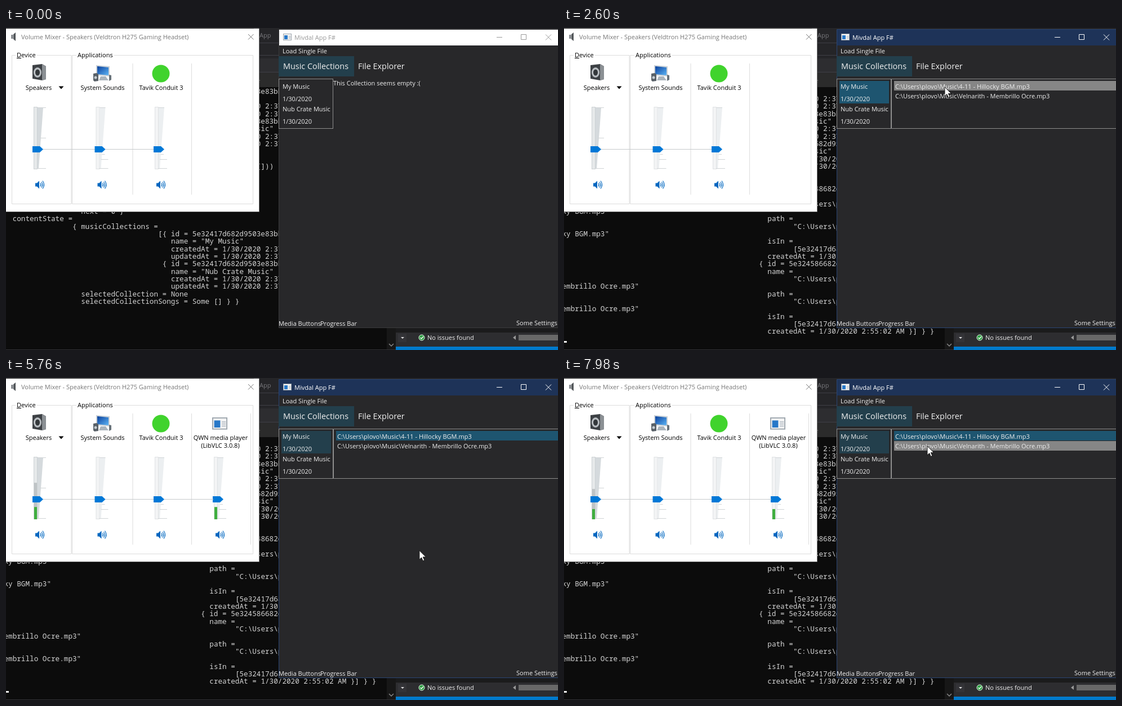
Animation of 980 by 572 pixels, one loop 8 s. Source, as an HTML page:

```html
<!DOCTYPE html>
<html lang="en">
<head>
<meta charset="utf-8">
<title>Music app with volume mixer</title>
<style>
html, body { margin: 0; width: 100%; height: 100%; overflow: hidden; background: #0c0c0c; }
svg { display: block; width: 980px; height: 572px; }
text { font: 11px "Open Sans", sans-serif; white-space: pre; }
.mono { font: 12.667px "Noto Sans Mono", monospace; fill: #d4d4d4; }
.tab { font-size: 14.4px; }
.mid { text-anchor: middle; }
.light { fill: #f0f0f0; }
.line { fill: none; stroke: #dcdcdc; }
.frame { fill: none; stroke: #8e8e8e; }
</style>
</head>
<body>
<svg viewBox="0 0 980 572">
  <defs>
    <clipPath id="consoleClip"><rect y="105" width="676" height="465"/></clipPath>
    <linearGradient id="screen" x2="1" y2="1"><stop stop-color="#0a3f9c"/><stop offset="1" stop-color="#5cb4f5"/></linearGradient>
    <g id="appIcon">
      <rect x=".5" y=".5" width="14" height="11" fill="#f4f4f4" stroke="#9aa3ab"/>
      <rect x="2" y="3" width="6" height="7" fill="#2878c8"/>
      <path d="M9.5 4.5h4M9.5 6.5h4M9.5 8.5h4" stroke="#b4bcc4"/>
    </g>
  </defs>

  <!-- editor and console behind -->
  <rect width="980" height="572" fill="#0c0c0c"/>
  <rect x="440" width="540" height="80" fill="#252528"/>
  <path d="M440 26.5h44M440 48.5h44M440 78.5h44" stroke="#3f3f46"/>
  <rect x="440" y="54" width="44" height="24" fill="#2d2d30"/>
  <rect x="440" y="79" width="44" height="26" fill="#2b2b2b"/>
  <text x="450" y="17" fill="#77777b">App</text>
  <text x="445" y="97" fill="#aaa">e</text>
  <g id="console" clip-path="url(#consoleClip)"></g>
  <rect id="caret" y="556" width="5" height="3" fill="#eee"/>
  <rect x="676" y="533" width="16" height="38" fill="#171717"/>
  <path d="M680 561l4 4 4-4" fill="none" stroke="#888" stroke-width="1.5"/>
  <rect y="571" width="692" height="1" fill="#333337"/>
  <rect x="692" y="533" width="288" height="9" fill="#1b1b1c"/>
  <rect x="692" y="541" width="288" height="25" fill="#2d2d30"/>
  <rect x="692" y="566" width="288" height="6" fill="#007acc"/>
  <rect x="696" y="543" width="15" height="15" fill="#333337"/>
  <path d="M701 549h6l-3 3z" fill="#ddd"/>
  <circle cx="738" cy="550" r="5" fill="#2f9e44" stroke="#e8f5e8"/>
  <path d="M735.5 550l2 2 3.5-4" fill="none" stroke="#fff" stroke-width="1.4"/>
  <text class="light" x="748" y="554">No issues found</text>
  <path d="M905 546v8l-5-4z" fill="#999"/>
  <rect x="910" y="545" width="70" height="10" fill="#686868"/>

  <!-- music app -->
  <rect x="484" y="2" width="496" height="531" fill="#28282a"/>
  <rect id="titleBar" x="484" y="3" width="496" height="28"/>
  <path id="appBorder" d="M980 2.5H484.5V532.5H980" fill="none"/>
  <use href="#appIcon" x="492" y="10"/>
  <g id="titleInk">
    <text x="512" y="20.5" stroke="none">Mivdal App F#</text>
    <path d="M871 16.5h10M914.5 11.5h9v9h-9zM958 11.5l10 10m0-10l-10 10" fill="none"/>
  </g>
  <rect x="484" y="50" width="134" height="36" fill="#233f4c"/>
  <g class="light">
    <text x="491" y="45">Load Single File</text>
    <text class="tab" x="492" y="73">Music Collections</text>
    <text class="tab" x="625" y="73">File Explorer</text>
    <text x="484" y="529">Media Buttons</text>
    <text x="558" y="529">Progress Bar</text>
    <text x="906" y="527.5">Some Settings</text>
  </g>
  <rect class="frame" x="484.5" y="90.5" width="96" height="88"/>
  <rect id="collection" x="489" y="94" width="88" height="40"/>
  <g class="light">
    <text x="491" y="107.5">My Music</text>
    <text x="491" y="130">1/30/2020</text>
    <text x="491" y="147.5">Nub Crate Music</text>
    <text x="491" y="170">1/30/2020</text>
    <text id="empty" x="581" y="102">This Collection seems empty :(</text>
    <g id="songs">
      <path class="frame" d="M980 90.5H581.5V178.5H980"/>
      <rect id="song1" x="586" y="94" width="394" height="17"/>
      <rect id="song2" x="586" y="112" width="394" height="17"/>
      <text id="path1" x="588" y="107.5"></text>
      <text id="path2" x="588" y="124.5"></text>
    </g>
  </g>

  <!-- volume mixer -->
  <rect y="1" width="449" height="325" fill="#fff"/>
  <path d="M449.5 1V326.5H0" fill="none" stroke="#6a6a6a"/>
  <path d="M9 12h3l5-4v15l-5-4h-3z" fill="#8b8f93"/>
  <path d="M14 11l3-3v15l-3-3z" fill="#4d5154"/>
  <text x="27" y="20" fill="#777">Volume Mixer - Speakers (Veldtron H275 Gaming Headset)</text>
  <path d="M430 11l9.5 9.5m0-9.5l-9.5 9.5" stroke="#777"/>
  <path class="line" d="M10.5 48.5h105.500v264h-105.500zM117.500 48.5H438.500v264H117.500zM225 63V296M329.500 63V296"/>
  <path d="M17 48.5h38M125 48.5h67" stroke="#fff" stroke-width="3"/>
  <text x="19" y="52"><tspan text-decoration="underline">D</tspan>evice</text>
  <text x="127" y="52">Applications</text>
  <path d="M47 66l17-2 7 4v23l-7 2-17-3z" fill="#3d4145"/>
  <path d="M64 64l7 4v23l-7 2z" fill="#8b9094"/>
  <ellipse cx="56" cy="79" rx="7" ry="9" fill="#b9bec2"/>
  <ellipse cx="56" cy="79" rx="4" ry="5.500" fill="#34383b"/>
  <path d="M93.500 103.500h9l-4.500 5z"/>
  <path d="M160 66l24 2v18l-24-2z" fill="#c8d0d6"/>
  <path d="M162 68l20 2v14l-20-2z" fill="url(#screen)"/>
  <path d="M168 86h9l5 7h-17z" fill="#aab4bc"/>
  <path d="M155 81l6-1 3 2v12l-7 1-2-2z" fill="#596168"/>
  <circle cx="159" cy="88" r="2.500" fill="#c5ccd1"/>
  <path d="M183 83l4 1v8l-4 2z" fill="#69737b"/>
  <circle cx="275" cy="81" r="15.500" fill="#40d32d"/>
  <g class="mid">
    <text x="58" y="109.500">Speakers</text>
    <text x="171.500" y="110">System Sounds</text>
    <text x="275.500" y="110">Tavik Conduit 3</text>
  </g>
  <path d="M64 215.500H264" stroke="#c6cacc"/>
  <g id="channels"></g>
  <g id="playerChannel">
    <path class="line" d="M434.500 63V296"/>
    <path d="M281 215.500H368" stroke="#c6cacc"/>
    <g transform="translate(366 70) scale(1.8)"><use href="#appIcon"/></g>
    <text class="mid" x="381" y="110">QWN media player</text>
    <text class="mid" x="380.500" y="124">(LibVLC 3.0.8)</text>
  </g>

  <circle id="halo" r="11" fill="#dcba28" opacity=".75"/>
  <path id="arrow" d="M0 0V16l3.700-3.500 2.600 5.800 2.600-1.100-2.600-5.700h5.200z" fill="#fff" stroke="#111" stroke-width=".9"/>
  <path id="resize" d="M0-10l4 5H1V5h3l-4 5-4-5h3V-5h-3z" fill="#fff" stroke="#111" stroke-width=".8"/>
</svg>
<script>
const $ = id => document.getElementById(id);
const LOOP = 8000;
const folder = 'C:\\Users\\plovo\\Music\\';
const songA = folder + '4-11 - Hillocky BGM.mp3';
const songB = folder + 'Velnarith - Membrillo Ocre.mp3';
$('path1').textContent = songA;
$('path2').textContent = songB;

// Console lines are [column, text] pairs.
const idA = '5e32417d682d9503e83bb400', idB = '5e32417d682d9503e83bb401';
const songId = '5e324248682d9503e83bb3ff';
const stamp = (col, end = '') => [
  [col, 'createdAt = 1/30/2020 2:37:49 AM'], [col, 'updatedAt = 1/30/2020 2:37:49 AM' + end],
];
const blank = n => Array(n).fill([0, '']);
const collections = [
  [36, `[{ id = ${idA}`], [39, 'name = "My Music"'], ...stamp(39),
  [37, `{ id = ${idB}`], [39, 'name = "Nub Crate Music"'], ...stamp(39),
];
const wrapped = path => [[54, `"${path}"`.slice(0, 35)], [0, `"${path}"`.slice(35)]];
const songRecord = (col, open, id, path, created) => [
  [col, `${open} id = ${id}`],
  [48, 'name ='], ...wrapped(path), [48, 'path ='], ...wrapped(path),
  [48, 'isIn ='], [54, `[${idB}]`], [48, `createdAt = 1/30/2020 ${created}`],
];
const idle = [
  ...collections, ...blank(2), [59, '[]))'], ...blank(5),
  [18, 'next = 0 }'], [2, 'contentState ='], [16, '{ musicCollections ='], ...collections,
  [18, 'selectedCollection = None'], [18, 'selectedCollectionSongs = Some [] } }'],
];
const selected = [
  ...idle, [0, `New message:: ContentMsg (SetSelectedCollection (Some { id = ${idA}`],
  [42, 'name = "My Music"'], ...stamp(42, ' }))'),
];
const loaded = [
  ...collections, [18, `selectedCollection = Some { id = ${idA}`],
  [46, 'name = "My Music"'], ...stamp(46, ' }'),
  [18, 'selectedCollectionSongs ='], [26, 'Some'],
  ...songRecord(45, '[{', songId, songA, '2:41:12 AM }'),
  ...songRecord(46, '{', '5e324586682d9503e83bb402', songB, '2:55:02 AM }] } }'),
];
const playing = [
  ...loaded, [0, `New message:: PlayerMsg (PlaySingle { id = ${songId}`],
  [24, `name = "${songA}"`], [24, `path = "${songA}"`],
  [24, `isIn = [${idB}]`], [24, 'createdAt = 1/30/2020 2:41:12 AM })'],
];
const consoleViews = [[...idle, ...blank(4)], selected, loaded, playing].map(lines =>
  lines.slice(-34).map(([col, text], i, all) =>
    `<text class="mono" x="${-3.5 + col * 7.6}" y="${543.3 - (all.length - 1 - i) * 13.33}">${text}</text>`).join(''));

// Mixer channels share one shape, shifted sideways.
const channel = (dx, main) => `<g transform="translate(${dx})" ${dx === 320 ? 'class="player"' : ''}>
  <path d="M56 141h10L58 250h-2z" fill="${main ? '#d5dadd' : '#eceff1'}"/>
  <rect x="49.5" y="140.500" width="6" height="110" fill="${main ? '#e6e9ea' : '#f3f4f5'}" stroke="${main ? '#ccd1d4' : '#dfe2e4'}"/>
  <path d="M56 141.500h${main ? 15 : 10}M${main ? '61 195.500h10' : '58 233.500h13M60 224.500h5'}M55 249.500h16" stroke="#d0d4d6"/>
  ${main ? '<rect class="raw" x="50" width="5" fill="#bfc4c6"/>' : ''}
  ${main || dx === 320 ? '<rect class="level" x="50" width="5" fill="#3fae3f"/>' : ''}
  <path d="M47 210h13l6 5.500-6 5.500h-13z" fill="#0078d7"/>
  <path d="M52 275.500h3l4-4v14l-4-4h-3z" fill="#0067c0"/>
  <path d="M61 275.500q2 3 0 6M63 273.500q3.500 5 0 10M65 271.500q5 7 0 14" fill="none" stroke="#0067c0" stroke-width="1.200"/>
</g>`;
$('channels').innerHTML = channel(0, true) + [110.5, 215, 320].map(dx => channel(dx, false)).join('');
const [raw] = document.getElementsByClassName('raw');
const levels = document.querySelectorAll('.level');
const [player] = document.getElementsByClassName('player');

const pointerKeys = [
  [550, 808, 530], [1060, 523, 101], [2140, 523, 101], [2600, 676, 105], [3710, 676, 105],
  [4040, 711, 262], [4370, 711, 262], [4500, 711, 271], [5580, 711, 271], [6370, 883, 537],
  [6630, 883, 537], [7240, 668, 151], [7290, 668, 151], [7500, 645, 121],
];
const levelKeys = [
  [3900, 0], [4040, .4], [4370, .4], [4430, .51], [4500, .42], [4650, .42], [4680, .33], [4830, .33],
  [4950, .51], [5060, .4], [5200, .4], [5300, .61], [5430, .45], [5580, .45], [5800, .62], [6100, .38],
  [6370, .5], [6450, .5], [6550, .41], [6630, .41], [6900, .55], [7240, .4], [7290, .4], [7500, .5],
  [7650, .42], [7800, .42], [7900, .51], [7980, .49],
];
const smooth = u => u * u * (3 - 2 * u);
function sample(keys, t, ease = u => u) {
  const next = keys.findIndex(key => key[0] > t);
  if (next < 0) return keys.at(-1).slice(1);
  if (next === 0) return keys[0].slice(1);
  const a = keys[next - 1], b = keys[next];
  const u = ease((t - a[0]) / (b[0] - a[0]));
  return a.slice(1).map((v, i) => v + (b[i + 1] - v) * u);
}

const show = (el, on) => el.setAttribute('visibility', on ? 'visible' : 'hidden');
const place = (el, x, y) => el.setAttribute('transform', `translate(${x} ${y})`);
const fill = (id, color) => $(id).setAttribute('fill', color);
let view = -1;

function draw(t) {
  const active = t >= 1350, opened = t >= 1450, played = t >= 3200, mixed = t >= 3800;
  const nextView = !active ? 0 : t < 1500 ? 1 : t < 3300 || mixed ? 2 : 3;
  if (nextView !== view) $('console').innerHTML = consoleViews[view = nextView];
  show($('caret'), active);

  const ink = active ? '#fff' : '#999';
  fill('titleBar', active ? '#1e3358' : '#fff');
  $('appBorder').setAttribute('stroke', active ? '#2a4573' : '#3a3a3c');
  fill('titleInk', ink);
  $('titleInk').setAttribute('stroke', ink);

  const [x, y] = sample(pointerKeys, t, smooth);
  const pointed = t >= 550;
  const overCollection = pointed && x > 489 && x < 577 && y > 94 && y < 134;
  const overSong = top => pointed && x > 586 && y >= top && y < top + 17;
  fill('collection', played ? '#233f4c' : opened ? (overCollection ? '#1c6f99' : '#1e5570')
    : overCollection ? '#868686' : 'none');
  fill('song1', played ? (overSong(94) ? '#1c6f99' : '#1e5570') : overSong(94) ? '#868686' : 'none');
  fill('song2', overSong(112) ? '#868686' : 'none');
  show($('empty'), !opened);
  show($('songs'), opened);

  show($('playerChannel'), mixed);
  show(player, mixed);
  const [level] = sample(levelKeys, t);
  const setBar = (bar, height) => {
    bar.setAttribute('y', 251 - height);
    bar.setAttribute('height', height);
  };
  setBar(raw, level * 110);
  levels.forEach(bar => setBar(bar, level * 37));

  const resizing = y > 529 && t > 5580;
  show($('arrow'), pointed && !resizing);
  show($('resize'), resizing);
  place($('arrow'), x, y);
  place($('resize'), x, y);
  show($('halo'), (t >= 1350 && t < 1500) || (t >= 3200 && t < 3400));
  place($('halo'), x - 1, y);
}

const start = performance.now();
function tick() {
  draw((performance.now() - start) % LOOP);
  requestAnimationFrame(tick);
}
tick();
</script>
</body>
</html>
```
